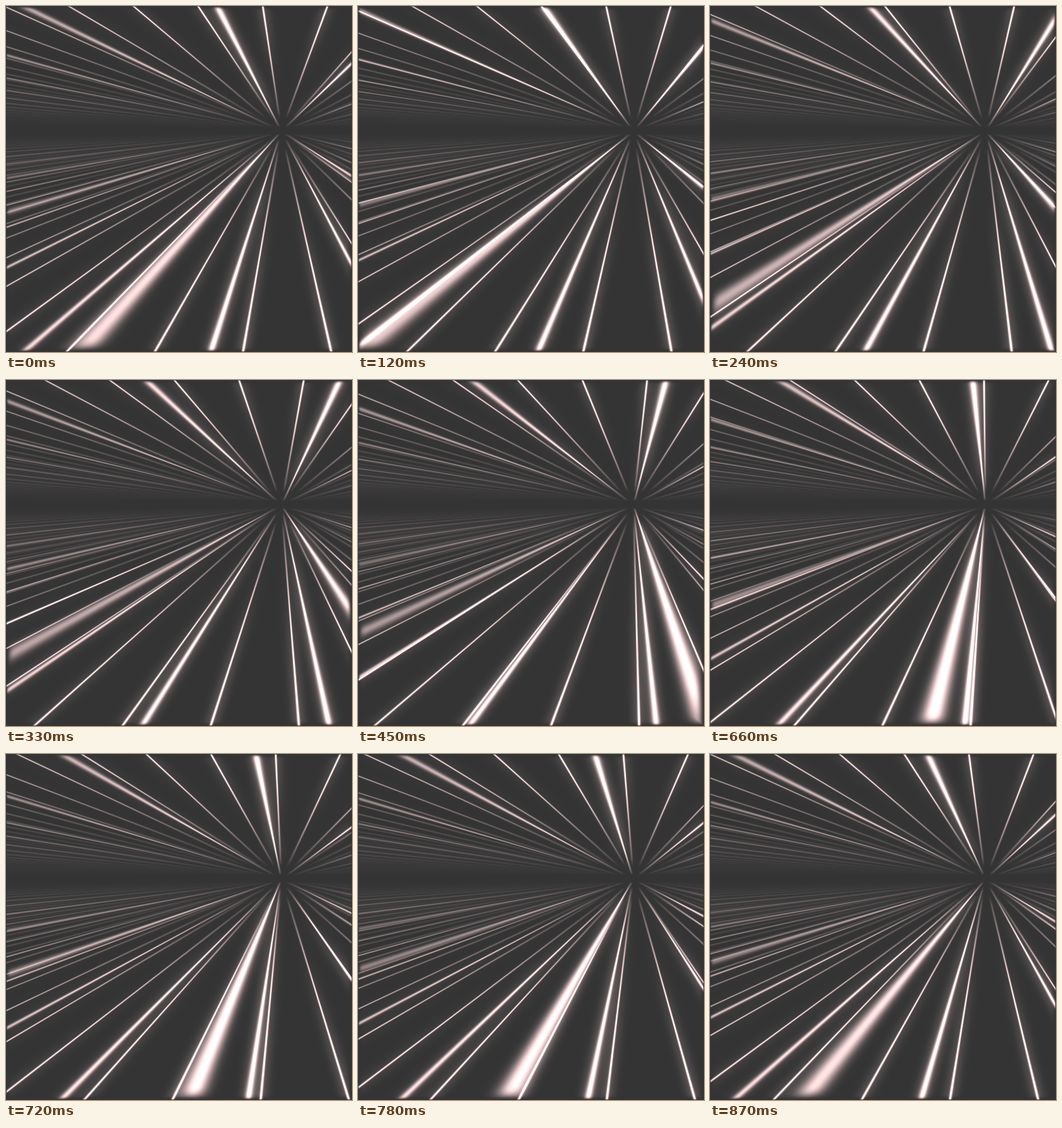
An HTML page with a canvas that plays this animation: 500 by 500 pixels, repeating every 0.9 s.

```html
<!DOCTYPE html>
<html>
<head>
<meta charset="utf-8">
<style>
html, body { margin: 0; overflow: hidden; background: #343434; }
canvas { display: block; }
</style>
</head>
<body>
<canvas id="stage" width="500" height="500"></canvas>
<script>
const SIZE = 500, LOOP = 900, STEP = 30;
const VX = 398, VY = 181;          // vanishing point
const BASE = 52, HALO = 7;
const STRIDE = 6;

// Parallel light strips on horizontal planes; gap and start are slopes dx/dy.
const ceiling = [{ gap: .517, start: -.149 }, { gap: 1.55, start: -.514 }];
const ground = [{ gap: .4, start: -.174 }, { gap: .848, start: -.32 }, { gap: 2.48, start: -.91 }];

const ctx = document.getElementById('stage').getContext('2d');
const image = ctx.createImageData(SIZE, SIZE);
const pixels = image.data;

const erf = x => Math.tanh(1.129 * x + .1 * x ** 3);
const smooth = (lo, hi, x) => {
  const k = Math.min(1, Math.max(0, (x - lo) / (hi - lo)));
  return k * k * (3 - 2 * k);
};
const edgeFade = (edge, blur) => 1 - Math.exp(-(edge * edge) / (1.5 * blur * blur));

// Everything that does not depend on time, per pixel and plane:
// phase, strip spacing, core strength and falloff, halo strength and falloff.
const cells = new Float32Array(SIZE * VY * 2 * STRIDE + SIZE * (SIZE - VY) * 3 * STRIDE);
let at = 0;
for (let y = 0; y < SIZE; y++) {
  for (let x = 0; x < SIZE; x++) {
    const dx = x + .5 - VX, dy = Math.abs(y + .5 - VY);
    const edge = Math.min(x, y, SIZE - 1 - x, SIZE - 1 - y) + .5;
    for (const { gap, start } of y < VY ? ceiling : ground) {
      const near = gap * dy;
      const spacing = near * dy / Math.hypot(dx, dy);
      const half = .015 * spacing;
      const blur = Math.hypot(.55, .0125 * (near - 80));
      const peak = erf(half / (blur * Math.SQRT2));
      const spread = blur * blur + half * half / 3;
      const haloSpread = HALO * HALO + spread;
      const fog = smooth(8, 16, near);
      cells.set([
        (dx / dy - start) / gap,
        spacing,
        peak * fog * edgeFade(edge, blur),
        .5 / spread,
        .8 * 2 * half * peak ** 3 / Math.sqrt(2 * Math.PI * haloSpread) * fog * edgeFade(edge, 4),
        .5 / haloSpread
      ], at);
      at += STRIDE;
    }
  }
}

function draw(progress) {
  let c = 0;
  for (let i = 0; i < SIZE * SIZE; i++) {
    const planes = i < SIZE * VY ? 2 : 3;
    let light = 0;
    for (let n = 0; n < planes; n++, c += STRIDE) {
      const phase = cells[c] + progress;
      const d = (phase - Math.round(phase)) * cells[c + 1];
      const core = d * d * cells[c + 3], halo = d * d * cells[c + 5];
      if (core < 8) light += cells[c + 2] * Math.exp(-core);
      if (halo < 8) light += cells[c + 4] * Math.exp(-halo);
    }
    const p = i * 4;
    pixels[p] = BASE + 250 * light;
    pixels[p + 1] = pixels[p + 2] = BASE + 208 * light;
    pixels[p + 3] = 255;
  }
  ctx.putImageData(image, 0, 0);
}

const begin = performance.now();
let shown = -1;
function tick() {
  const step = Math.floor((performance.now() - begin) % LOOP / STEP);
  if (step !== shown) draw((shown = step) * STEP / LOOP);
  requestAnimationFrame(tick);
}
tick();
</script>
</body>
</html>
```
